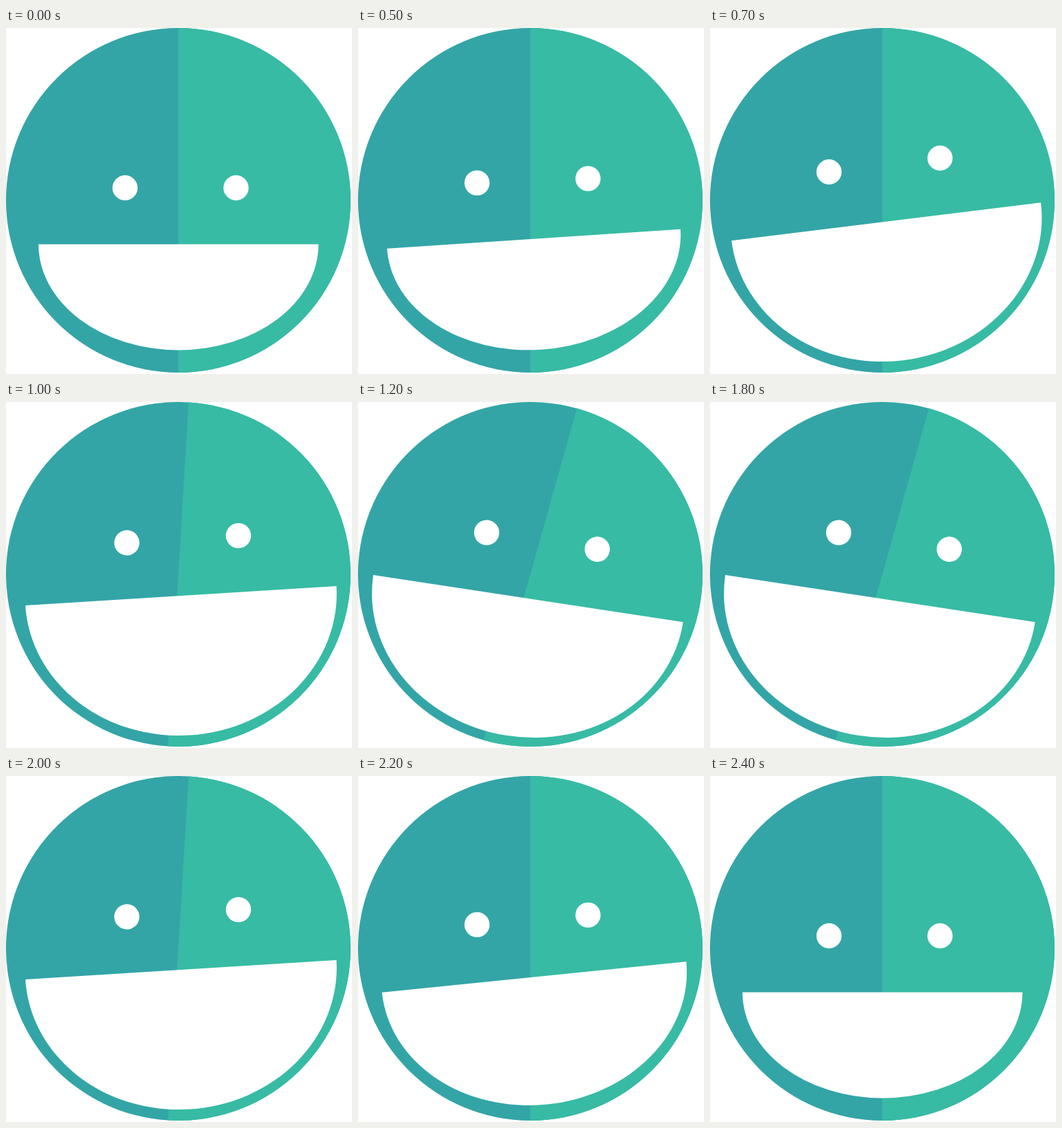
An HTML page with a canvas that plays this animation: 500x500 px, repeating every 2500 ms.

```html
<!DOCTYPE html>
<html lang="en">
<head>
<meta charset="utf-8">
<title>Winking face</title>
<style>
  html, body { margin: 0; width: 100%; height: 100%; overflow: hidden; background: #fff; }
  canvas { display: block; width: 500px; height: 500px; }
</style>
</head>
<body>
<canvas id="stage"></canvas>
<script>
const canvas = document.getElementById('stage');
const ctx = canvas.getContext('2d');
const ratio = window.devicePixelRatio || 1;
canvas.width = canvas.height = 500 * ratio;

const LOOP = 2500, STEP = 100;
const C = 249; // centre and radius of the face
const DEG = Math.PI / 180;
const EYE = 18.2;

const mix = (a, b, p) => a + (b - a) * p;
const mixAll = (a, b, p) => a.map((v, i) => mix(v, b[i], p));

// Mouth as a tilted half ellipse: centre x, y, radii, tilt in degrees
const grin = [249.25, 312.5, 202.3, 153, 0];
const open = [254.6, 279.7, 225.2, 202, -7];
const lean = [255.5, 283.5, 226.4, 200.4, -7];
const wide = [253.7, 279.2, 231.5, 204, -9.5];
const mouths = [
  grin,
  [254, 304.7, 212.5, 160.4, -3.78],
  [254.5, 290.5, 221, 185, -5.8],
  open, open,
  mixAll(open, lean, 0.5),
  lean,
  mixAll(lean, wide, 0.25),
  mixAll(lean, wide, 0.65),
  wide
];
const lifts = [0, 0.31, 0.7];
const winks = { 7: 0.15, 8: 0.6, 9: 1 };

// Head turn: a sine ease to 30 degrees
const turn = pose => pose < 4 ? 0
  : 15 * (1 - Math.cos(Math.PI * (0.22 + 0.147 * (pose - 4))));

// Out with pauses, then straight back through the same poses
function poseAt(k) {
  if (k > 15) return 24 - k;
  if (k >= 10) return k - 6;
  return Math.max(0, Math.min(3, k - 4));
}

function half(color, from, to) {
  ctx.fillStyle = color;
  ctx.beginPath();
  ctx.arc(0, 0, C, from, to);
  ctx.fill();
}

function eye(x, y, wink) {
  const w = mix(2 * EYE, 58.5, wink), h = mix(2 * EYE, 17, wink);
  ctx.save();
  ctx.translate(x + 1.3 * wink, y + 0.8 * wink);
  ctx.rotate(-16.6 * DEG * wink);
  ctx.beginPath();
  if (wink) ctx.roundRect(-w / 2, -h / 2, w, h, h / 2 * (1 - wink));
  else ctx.arc(0, 0, EYE, 0, 2 * Math.PI);
  ctx.fill();
  ctx.restore();
}

function draw(pose) {
  const lift = lifts[pose] ?? 1;
  const [mx, my, rx, ry, tilt] = mouths[pose];
  ctx.setTransform(ratio, 0, 0, ratio, 0, 0);
  ctx.fillStyle = '#fff';
  ctx.fillRect(0, 0, 500, 500);
  ctx.translate(C, C);
  ctx.rotate(turn(pose) * DEG);

  // The full disc underneath keeps the seam closed
  half('#33a5a6', 0, 2 * Math.PI);
  half('#37bba4', -Math.PI / 2, Math.PI / 2);

  ctx.translate(-C, -C);
  ctx.fillStyle = '#fff';
  eye(172, mix(231, 208, lift), 0);
  eye(332.4, mix(231, 188, lift), winks[pose] || 0);
  ctx.beginPath();
  ctx.ellipse(mx, my, rx, ry, tilt * DEG, 0, Math.PI);
  ctx.fill();
}

const start = performance.now();
function tick() {
  const t = (performance.now() - start) % LOOP;
  draw(poseAt(Math.floor(t / STEP)));
  requestAnimationFrame(tick);
}
tick();
</script>
</body>
</html>
```
